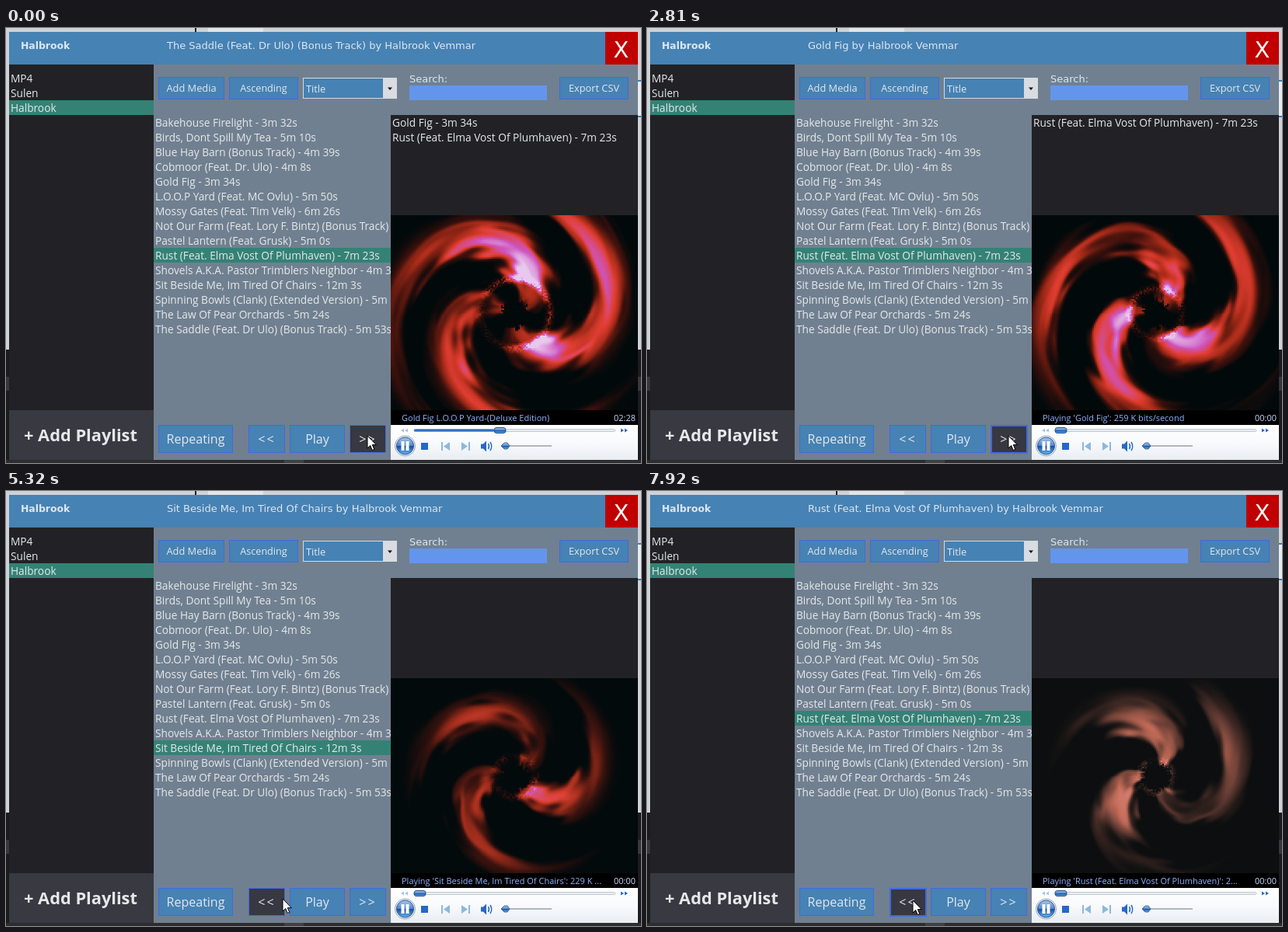
Write an HTML page with a canvas that moves like this. It is 817 by 560 pixels and loops after 8000 ms.

```html
<!DOCTYPE html>
<html lang="en">
<head>
<meta charset="utf-8">
<title>Media player</title>
<style>
  html, body { margin: 0; width: 817px; height: 560px; overflow: hidden; background: #2d2d30; }
  svg { position: absolute; left: 0; top: 0; }
  canvas { position: absolute; left: 495px; top: 241px; width: 318px; height: 251px; image-rendering: pixelated; }
  text { font-family: "Open Sans", "Noto Sans", sans-serif; fill: #e6e8ea; white-space: pre; }
  .wide { font-family: "DejaVu Sans", sans-serif; font-size: 13px; fill: #dde7f0; }
  .row { font-size: 13.7px; }
  .note { font-size: 11px; fill: #8fb2ff; }
</style>
</head>
<body>
<svg id="ui" width="817" height="560"></svg>
<canvas id="visual" width="159" height="126"></canvas>
<script>
const LOOP = 8000;
const ARTIST = 'Halbrook Vemmar';
const songs = [
  ['Bakehouse Firelight', '3m 32s'],
  ['Birds, Dont Spill My Tea', '5m 10s'],
  ['Blue Hay Barn (Bonus Track)', '4m 39s'],
  ['Cobmoor (Feat. Dr. Ulo)', '4m 8s'],
  ['Gold Fig', '3m 34s'],
  ['L.O.O.P Yard (Feat. MC Ovlu)', '5m 50s'],
  ['Mossy Gates (Feat. Tim Velk)', '6m 26s'],
  ['Not Our Farm (Feat. Lory F. Bintz) (Bonus Track)', '4m 17s'],
  ['Pastel Lantern (Feat. Grusk)', '5m 0s'],
  ['Rust (Feat. Elma Vost Of Plumhaven)', '7m 23s'],
  ['Shovels A.K.A. Pastor Trimblers Neighbor', '4m 33s'],
  ['Sit Beside Me, Im Tired Of Chairs', '12m 3s'],
  ['Spinning Bowls (Clank) (Extended Version)', '5m 13s'],
  ['The Law Of Pear Orchards', '5m 24s'],
  ['The Saddle (Feat. Dr Ulo) (Bonus Track)', '5m 53s']
];
const label = i => songs[i].join(' - ');

// Each state begins with a click; the song plays once it has connected.
const states = [
  { at: 0, plays: 0, song: 14, row: 9, queue: [4, 9], note: 'Gold Fig L.O.O.P Yard-(Deluxe Edition)', clock: '02:28' },
  { at: 700, plays: 2110, song: 4, row: 9, queue: [9], tail: ': 259 K bits/second' },
  { at: 3130, plays: 3280, song: 9, row: 9, queue: [], tail: ': 2...' },
  { at: 3900, plays: 3980, song: 10, row: 10, queue: [], tail: '...' },
  { at: 4680, plays: 4760, song: 11, row: 11, queue: [], tail: ': 229 K ...' },
  { at: 6740, plays: 6820, song: 10, row: 10, queue: [], tail: '...', clockAt: 6930 },
  { at: 7370, plays: 7450, song: 9, row: 9, queue: [], tail: ': 2...' }
];

const BLUE = '#4682b4', EDGE = '#4169e1', DARK = '#222226', GREEN = '#348275';
const rect = (x, y, w, h, fill, more = '') => `<rect x="${x}" y="${y}" width="${w}" height="${h}" fill="${fill}" ${more}/>`;
const text = (x, y, s, more = '') => `<text x="${x}" y="${y}" ${more}>${s.replace(/</g, '&lt;')}</text>`;
const path = (d, fill, more = '') => `<path d="${d}" fill="${fill}" ${more}/>`;
const button = (x, y, w, h, s, size, id = '', more = '') =>
  rect(x + .5, y + .5, w - 1, h - 1, BLUE, `stroke="${EDGE}" shape-rendering="crispEdges" id="${id}"`) +
  text(x + w / 2, y + h / 2 + size * .36, s, `font-size="${size}" text-anchor="middle" ${more}`);

const desktop =
  rect(0, 0, 817, 414, '#cfd2d6') + rect(260, 0, 71, 5, '#e4e5e6') + rect(243, 0, 2, 5, '#222') +
  rect(813, 67, 4, 47, '#e8ecf0') + rect(813, 67, 4, 2, '#2f7fc4') + rect(813, 113, 4, 2, '#2f7fc4') +
  rect(0, 414, 817, 146, '#1c1c1f') + rect(0, 449, 817, 18, '#38383c') + rect(0, 556, 817, 4, '#2d2d30') +
  rect(358, 556, 25, 4, '#404045');

const header =
  rect(4, 5, 809, 42, BLUE) + rect(771, 5, 42, 42, '#c00000') +
  text(791.5, 37.5, 'X', 'class="wide" text-anchor="middle" style="font-size:29px;fill:#fff"') +
  text(19, 27, 'Halbrook', 'class="wide" font-weight="bold" style="font-size:12.4px"') +
  text(207, 27, '', 'class="wide" id="title"') +
  path('M204 36.5Q225 37 239 36Q238 34 270 34', 'none',
    'id="mark" stroke="#b01010" stroke-width="4" stroke-linecap="round" stroke-linejoin="round"');

const sidebar =
  rect(4, 47, 186, 445, DARK) + rect(4, 93, 186, 19, GREEN) + rect(4, 492, 186, 64, '#383941') +
  ['MP4', 'Sulen', 'Halbrook'].map((s, i) => text(6, 70 + 19 * i, s, 'class="row"')).join('') +
  text(23, 532, '+ Add Playlist', 'font-size="21.8" font-weight="bold"');

const toolbar =
  button(196, 63, 85, 29, 'Add Media', 12.8) + button(287, 63, 89, 29, 'Ascending', 12.6) +
  rect(382.5, 64.5, 120, 26, BLUE, 'stroke="#d5dae0"') + rect(485, 65, 18, 26, '#d9dce0') +
  path('M491 76.5h6l-3 3.5z', '#111') + text(386, 82.5, 'Title', 'font-size="12.8"') +
  text(519, 70, 'Search:', 'class="wide"') + rect(519, 74, 177, 19, '#6495ed') +
  button(712, 63, 89, 29, 'Export CSV', 12.8);

const list = rect(190, 0, 305, 19, GREEN, 'id="selected"') +
  songs.map((_, i) => text(192, 127 + 19 * i, label(i), 'class="row"')).join('');

const spaced = 'letter-spacing="2"';
const footer =
  button(196, 511, 96, 36, 'Repeating', 16) + button(312, 511, 47, 36, '<<', 16, 'back', spaced) +
  button(365, 511, 71, 36, 'Play', 16) + button(442, 511, 47, 36, '>>', 16, 'next', spaced);

const icon = '#2468c8', pale = '#8db8dc';
const player =
  rect(495, 112, 318, 129, DARK) + rect(495, 241, 318, 270, '#000') +
  [0, 1].map(i => text(497, 127 + 19 * i, '', `class="row" id="queue${i}"`)).join('') +
  text(509, 506, '', 'class="note" id="note"') + text(810, 506, '', 'class="note" id="clock" text-anchor="end" style="fill:#d0dcff"') +
  `<defs><linearGradient id="bar" x2="0" y2="1"><stop stop-color="#fff"/><stop offset=".5" stop-color="#f9fafc"/><stop offset="1" stop-color="#e8edf2"/></linearGradient>
   <linearGradient id="orb" x2="0" y2="1"><stop stop-color="#a9c9ee"/><stop offset=".48" stop-color="#4f86cc"/><stop offset=".52" stop-color="#1c4d9e"/><stop offset="1" stop-color="#63b6f0"/></linearGradient></defs>` +
  rect(495, 511, 318, 45, 'url(#bar)') +
  rect(525, 516.5, 259, 3, '#e8edf2', 'rx="1.5" stroke="#b4bec8" stroke-width=".8"') +
  rect(525, 516.5, 0, 3, '#2f6fc4', 'rx="1.5" id="progress"') +
  rect(0, 514.5, 15, 7, 'url(#orb)', 'rx="3" stroke="#24508f" id="thumb"') +
  path('M512 515.5v5l-4-2.5zM517 515.5v5l-4-2.5z', '#a5c4e4') +
  path('M791 515.5v5l4-2.5zM796 515.5v5l4-2.5z', icon, 'id="skip"') +
  '<circle cx="513.5" cy="538" r="13" fill="#e9eef3" stroke="#9aa8b6"/><circle cx="513.5" cy="538" r="11" fill="url(#orb)" stroke="#2a5596"/>' +
  path('M508.5 532h4v12h-4zM514.5 532h4v12h-4z', '#fff', 'id="pause"') +
  path('M510 531l9 7-9 7z', '#9cc4f2', 'id="ready"') +
  rect(534, 534, 9, 9, icon) +
  path('M560 533h2v11h-2zM571 533v11l-8-5.5z', pale) + path('M595 533h2v11h-2zM586 533v11l8-5.5z', pale) +
  path('M611 535.5h3l4-4v14l-4-4h-3z', icon) +
  path('M620.5 535q2 3.5 0 7M623 533q3.5 5.5 0 11', 'none', `stroke="${icon}" stroke-width="1.5"`) +
  rect(638, 537, 64, 2, '#aeb6be') + path('M637 538l4-4h4l3 4-3 4h-4z', 'url(#orb)', 'stroke="#24508f" stroke-width=".8"');

const $ = id => document.getElementById(id);
$('ui').innerHTML = desktop + rect(190, 47, 623, 509, '#708090') + header + sidebar + toolbar + list + footer + player +
  path('M0 0v16l3.7-3.5 2.5 6 2.6-1.1-2.5-5.8h5z', '#fff', 'id="cursor" stroke="#000"');

// Linear interpolation over rows of [time, ...values].
function sample(keys, t) {
  let i = 0;
  while (i < keys.length - 2 && t > keys[i + 1][0]) i++;
  const a = keys[i], b = keys[i + 1];
  const f = Math.min(1, Math.max(0, (t - a[0]) / (b[0] - a[0])));
  return a.slice(1).map((v, j) => v + (b[j + 1] - v) * f);
}
const pointer = [[0, 465, 525], [3000, 465, 525], [4100, 455, 534], [5000, 455, 534],
  [5290, 356, 525], [5420, 356, 525], [5800, 342, 527]];
// time, gain, arm width, ring radius, brownness, reach, phase
const mood = [[0, 1.25, .88, 42, 0, 205, -.55], [2810, 1.15, .8, 30, 0, 195, -.7], [4210, 1.12, .68, 18, .04, 158, -.9],
  [5320, .82, .62, 24, .1, 152, -.9], [6890, 1.3, .8, 18, .75, 128, -.9], [7920, .85, .7, 18, .95, 150, -.9]];

let seed = 11;
const random = Array.from({ length: 4096 }, () => (seed = (seed * 16807) % 2147483647) / 2147483647);
const hash = (i, j) => random[(i * 57 + j * 1031) & 4095];
const smooth = (a, b, x) => { x = Math.min(1, Math.max(0, (x - a) / (b - a))); return x * x * (3 - 2 * x); };
function noise(x, y, period) {
  const i = Math.floor(x), j = Math.floor(y), u = smooth(0, 1, x - i), v = smooth(0, 1, y - j);
  const p = i % period, q = (i + 1) % period;
  const top = hash(p, j) + (hash(q, j) - hash(p, j)) * u;
  const low = hash(p, j + 1) + (hash(q, j + 1) - hash(p, j + 1)) * u;
  return top + (low - top) * v;
}

const W = 159, H = 126, TAU = Math.PI * 2;
const ctx = $('visual').getContext('2d'), image = ctx.createImageData(W, H);
const polar = Array.from({ length: W * H }, (_, k) => {
  const x = k % W * 2 - 159, y = Math.floor(k / W) * 2 - 126;
  const r = Math.hypot(x, y), angle = Math.atan2(y, x);
  return { r, angle, swirl: angle + 1.9 * (r / 135) ** 1.6 };
});
const ramp = [[0, 2, 9, 11], [.25, 62, 17, 12], [.55, 165, 42, 24], [.85, 226, 62, 50], [1.15, 205, 84, 190], [1.5, 232, 200, 238]];
const browns = [[0, 12, 14, 15], [.5, 108, 66, 56], [.9, 198, 112, 92], [1.4, 235, 180, 185]];
const shades = Array.from({ length: 151 }, (_, i) => [sample(ramp, i / 100), sample(browns, i / 100)]);

// Three spiral arms, frayed and lit by clouds that drift outward.
function drawVisual(t) {
  const [gain, width, ring, brown, reach, phase] = sample(mood, t);
  const flow = t / 1000, tick = Math.floor(t / 80);
  polar.forEach(({ r, angle, swirl }, k) => {
    const turn = ((swirl - phase) / TAU + 4) % 1;
    const broad = noise(turn * 9, r / 45 - flow * .8 + 40, 9);
    const fine = noise(turn * 30, r / 14 - flow * 2 + 90, 30);
    const bend = turn + .11 * (broad - .5) + .06 * (fine - .5);
    const arm = smooth(1 - width, 1, .5 + .5 * Math.cos(3 * bend * TAU));
    const cloud = smooth(.1, .9, .68 * broad + .32 * fine);
    const core = 13 + 8 * hash(Math.floor((angle + 4) * 7), 3);
    let light = gain * arm * (.12 + 1.05 * cloud) * (1 - smooth(.6 * reach, reach, r)) * (1.3 - .85 * r / reach);
    light *= smooth(core, core + 3, r) * (.4 + .6 * smooth(ring - 4, ring + 6, r));
    const near = Math.abs(r - ring - 3);
    if (near < 7 && r > core) light += gain * .5 * hash(k + tick, 7) * (1 - near / 7) * (.15 + cloud);
    const [red, tan] = shades[Math.min(150, Math.floor(light * 100))];
    for (let c = 0; c < 3; c++) image.data[k * 4 + c] = red[c] + (tan[c] - red[c]) * brown;
    image.data[k * 4 + 3] = 255;
  });
  ctx.putImageData(image, 0, 0);
}

function styleButton(id, hover, focused) {
  $(id).setAttribute('fill', hover ? '#373841' : BLUE);
  $(id).setAttribute('stroke-width', focused ? 2 : 1);
}

function render(t) {
  const s = states.filter(state => state.at <= t).pop();
  const playing = t >= s.plays, name = songs[s.song][0];
  $('title').textContent = `${name} by ${ARTIST}`;
  $('selected').setAttribute('y', 112 + 19 * s.row);
  [0, 1].forEach(i => $('queue' + i).textContent = i in s.queue ? label(s.queue[i]) : '');
  $('note').textContent = playing ? s.note || `Playing '${name}'${s.tail}` : 'Connecting...';
  const elapsed = Math.floor((t - s.plays) / 1000);
  $('clock').textContent = playing && t >= (s.clockAt || 0) ? s.clock || `00:0${elapsed}` : '';

  const thumb = s.clock ? 628 : 525;
  $('thumb').setAttribute('x', thumb);
  $('progress').setAttribute('width', thumb - 525);
  $('pause').style.display = playing ? '' : 'none';
  $('ready').style.display = playing ? 'none' : '';
  $('skip').setAttribute('fill', playing ? icon : '#a5c4e4');

  $('mark').style.display = t >= 1150 && t < 2110 ? '' : 'none';
  $('mark').setAttribute('stroke-dasharray', t < 1630 ? '35 200' : 'none');

  const [x, y] = sample(pointer, t);
  $('cursor').setAttribute('transform', `translate(${x} ${y})`);
  styleButton('next', x > 442, t >= 700 && x > 359);
  styleButton('back', x < 359, t >= 6660);

  $('visual').style.visibility = playing ? 'visible' : 'hidden';
  if (playing) drawVisual(t);
}

function frame(now) {
  render(now % LOOP);
  requestAnimationFrame(frame);
}
requestAnimationFrame(frame);
</script>
</body>
</html>
```
